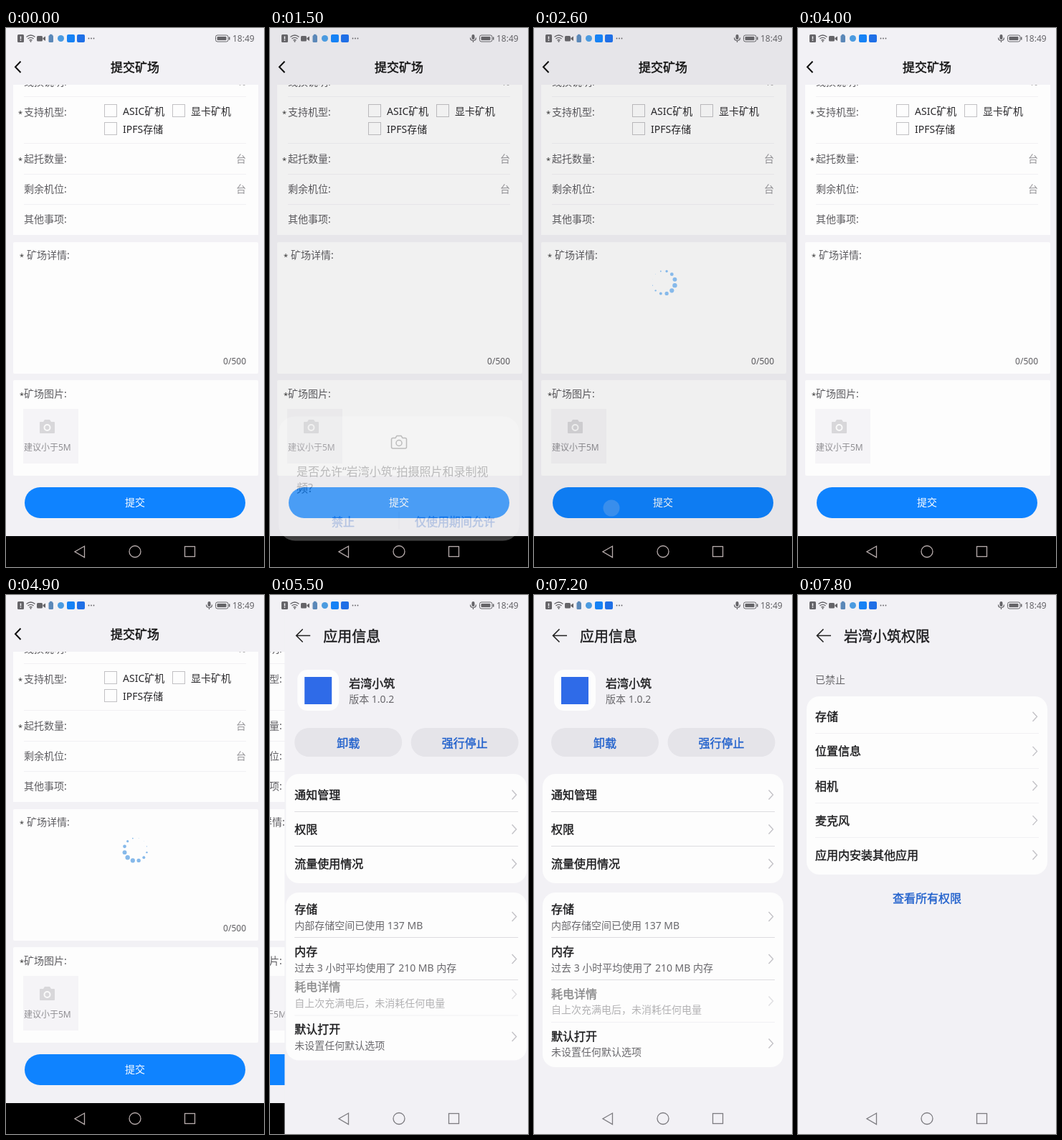
Write an HTML page that moves like this. It is 360 by 750 pixels and loops after 8 s.

```html
<!DOCTYPE html>
<html lang="zh-CN">
<head>
<meta charset="utf-8">
<style>
html, body { margin: 0; width: 100%; height: 100%; overflow: hidden; background: #f2f1f5; }
svg { display: block; width: 100vw; height: 100vh; }
text { font-family: "Noto Sans", "Noto Sans CJK SC", "Noto Sans CJK", sans-serif; white-space: pre; }
</style>
</head>
<body>
<svg id="stage" viewBox="0 0 360 750" xmlns="http://www.w3.org/2000/svg"></svg>
<script>
const LOOP = 8000, STEP = 100;
const APP = '岩湾小筑';
const BG = '#f2f1f5', CARD = '#fdfdfd', INK = '#1b1b1d', GREY = '#5d5c60', BLUE = '#2060cc';
const FAINT = '#f1f0f3';

// y is the visual middle of the line
const text = (s, x, y, size = 14, fill = GREY, anchor = 'start', more = '') =>
  `<text x="${x}" y="${y + size * .38}" font-size="${size}" fill="${fill}" text-anchor="${anchor}" ${more}>${s}</text>`;
// A hairline outline gives the medium weight
const medium = (s, x, y, size = 16, fill = INK, anchor = 'start') =>
  text(s, x, y, size, fill, anchor, `stroke="${fill}" stroke-width=".4"`);
const rect = (x, y, w, h, fill, r = 0, more = '') =>
  `<rect x="${x}" y="${y}" width="${w}" height="${h}" fill="${fill}" rx="${r}" ${more}/>`;
const path = (d, stroke, width = 1, more = '') =>
  `<path d="${d}" fill="none" stroke="${stroke}" stroke-width="${width}" ${more}/>`;
const group = (id, body, more = '') => `<g id="${id}" ${more}>${body}</g>`;
const rule = (y, x = 24, end = 336, color = '#dddce0') => path(`M${x} ${y + .5}H${end}`, color);
const chevron = y => path(`M327.5 ${y - 6.5}l6 6.5l-6 6.5`, '#c3c2c7', 1.4);

function formPage() {
  const line = y => rule(y, 25, 335, FAINT);
  const star = (x, y) => text('*', x, y + 1.5, 11, '#333');
  const check = (label, x, y) =>
    rect(x + .5, y + .5, 17, 17, CARD, 0, 'stroke="#c2c1c4"') + text(label, x + 26, y + 10, 14, '#29282b');
  return rect(0, 0, 360, 707, BG) + rect(0, 707, 360, 43, '#000') +
    rect(10, 79, 342, 209, CARD) + rect(10, 298, 342, 183, CARD, 2) + rect(10, 490, 342, 133, CARD, 2) +
    `<g clip-path="url(#body)">${text('线损说明:', 25, 75)}${text('%', 335, 75, 14, '#999', 'end')}</g>` +
    [95, 160, 203, 245].map(line).join('') +
    star(17, 117) + text('支持机型:', 25, 117) +
    check('ASIC矿机', 137, 106) + check('显卡矿机', 232, 106) + check('IPFS存储', 137, 131) +
    star(17, 182) + text('起托数量:', 25, 182) + text('台', 321, 182, 14, '#99989c') +
    text('剩余机位:', 25, 224) + text('台', 321, 224, 14, '#99989c') +
    text('其他事项:', 25, 266) +
    star(19, 316) + text('矿场详情:', 29, 316) + text('0/500', 335, 463, 12, GREY, 'end') +
    star(19, 509) + text('矿场图片:', 25, 509) +
    rect(24, 530, 77, 76, '#f5f4f7') +
    `<path d="M48 548h4l2-3h7l2 3h4q1 0 1 1v14q0 1-1 1h-19q-1 0-1-1v-14q0-1 1-1z" fill="#d8d7da"/>` +
    `<circle cx="57.5" cy="556" r="4" fill="none" stroke="#fafafa" stroke-width="2"/>` +
    text('建议小于5M', 25, 583, 12, '#8f8e92') +
    rect(26, 639, 308, 43, '#0f83ff', 21.5) + text('提交', 180, 660, 14, '#fff', 'middle') +
    path('M20.5 46.5L13 54.2L20.5 62', '#111', 2) +
    medium('提交矿场', 180, 55, 17, '#111', 'middle');
}

const titleBar = title => rect(0, 0, 360, 750, BG) +
  path('M46 56.5H27M35.5 47.500l-9 9l9 9', '#222', 1.6) + medium(title, 64, 57, 20);

function infoPage() {
  const row = (s, y) => medium(s, 24, y) + chevron(y);
  const detail = (s, sub, y) =>
    medium(s, 24, y) + text(sub, 24, y + 22.5, 14, '#69686c') + chevron(y + 10.5);
  const button = (s, x) => rect(x, 185, 150, 40, '#e5e4e9', 20) + medium(s, x + 75, 206, 16, BLUE, 'middle');
  return titleBar('应用信息') +
    rect(28, 104, 58, 57, CARD, 14) + rect(38, 114, 38, 38, '#2f6be8') +
    medium(APP, 100, 123) + text('版本 1.0.2', 100, 145, 14, '#69686c') +
    button('卸载', 24) + button('强行停止', 186.5) +
    rect(12, 249, 336, 152, CARD, 18) +
    row('通知管理', 278) + rule(301) + row('权限', 326) + rule(349) + row('流量使用情况', 374) +
    rect(12, 414, 336, 243, CARD, 18, 'id="usage"') +
    detail('存储', '内部存储空间已使用 137 MB', 437) + rule(476) +
    detail('内存', '过去 3 小时平均使用了 210 MB 内存', 496) + rule(535) +
    group('lowerRows',
      `<g opacity=".5">${detail('耗电详情', '自上次充满电后，未消耗任何电量', 554.5)}</g>` +
      rule(594, 24, 336, FAINT) + detail('默认打开', '未设置任何默认选项', 613.5));
}

function permissionPage() {
  const rows = ['存储', '位置信息', '相机', '麦克风', '应用内安装其他应用'];
  return titleBar(APP + '权限') + text('已禁止', 24, 118, 14, '#69686c') +
    rect(12, 141, 336, 248, CARD, 18) +
    rows.map((s, i) => {
      const y = 169.3 + i * 48.1;
      return (i ? rule(Math.round(y - 25), 24, 336, FAINT) : '') + medium(s, 24, y) + chevron(y);
    }).join('') +
    medium('查看所有权限', 180, 422, 16, BLUE, 'middle');
}

const dialog = () => rect(12, 518, 336, 173, CARD, 23) +
  path('M171.5 548h3.5l2-3h6l2 3h3.5q2 0 2 2v10.500q0 2-2 2h-17q-2 0-2-2v-10.500q0-2 2-2z', '#222', 1.5) +
  `<circle cx="180" cy="555" r="4" fill="none" stroke="#222" stroke-width="1.5"/>` +
  text(`是否允许“${APP}”拍摄照片和录制视`, 37, 594, 16, INK) + text('频?', 37, 617, 16, INK) +
  path('M180 651v24', '#dddce0') +
  medium('禁止', 102, 664, 16, BLUE, 'middle') + medium('仅使用期间允许', 258, 664, 16, BLUE, 'middle');

// Grey status marks inherit currentColor so they can turn white over the dim layer
const statusBar = () => {
  const c = 'currentColor';
  return rect(16, 9, 9, 11, c, 1.5) + path('M20.500 11.500v4M20.500 16.500v1.500', BG, 1.4) +
    path('M28.500 12.500q6-5 12 0M30.500 15q4-3.300 8 0M32.500 17.300q2-1.600 4 0', c, 1.4) +
    `<circle cx="34.500" cy="18.800" r="1" fill="${c}"/>` +
    rect(43, 11, 8, 7.500, c, 1.5) + `<path d="M51.500 14l3.500-2.500v6.500l-3.500-2.500z" fill="${c}"/>` +
    rect(59.500, 10, 6.500, 10, '#5b88b8', 1.5) + rect(61, 8.800, 3.500, 2, '#5b88b8') +
    `<circle cx="76.500" cy="14.500" r="4.500" fill="#4b9be0"/>` +
    rect(85, 9, 11, 11, '#1682f5', 2) + rect(99, 9, 11, 11, '#1f6fe6', 2) +
    [115.5, 119, 122.5].map(x => `<circle cx="${x}" cy="14.500" r=".9" fill="${c}"/>`).join('') +
    group('mic', rect(281.500, 9, 4, 7, c, 2) + path('M279.500 13.500q0 4 4 4t4-4M283.500 17.500v2.500', c, 1.2)) +
    rect(292.500, 10, 17.500, 9, 'none', 2.5, `stroke="${c}"`) + rect(294.500, 12, 13, 5, c, 1) + rect(311, 12.500, 1.5, 4, c) +
    text('18:49', 316, 14.500, 12, c);
};

const slidingPage = (id, body) =>
  `<clipPath id="${id}Clip">${rect(0, 0, 360, 750, '#000', 0, `id="${id}Edge"`)}</clipPath>` +
  group(id, body, `clip-path="url(#${id}Clip)"`);

const stage = document.getElementById('stage');
stage.innerHTML =
  '<clipPath id="body"><rect x="0" y="79" width="360" height="628"/></clipPath>' +
  group('form', formPage()) +
  rect(0, 0, 360, 707, '#000', 0, 'id="dim"') +
  group('spinner', '<circle/>'.repeat(12), 'fill="#86b9ea"') +
  group('dialog', dialog()) +
  '<circle id="touch" cx="108" cy="668" r="11.500" fill="#a9bfdf" fill-opacity=".28"/>' +
  slidingPage('info', infoPage()) + slidingPage('permission', permissionPage()) +
  group('status', statusBar()) +
  group('nav', '<path d="M109.500 721v15.500l-13.500-7.800z"/><circle cx="180" cy="728.500" r="8"/><rect x="249.500" y="721.500" width="14" height="14"/>',
    'fill="none" stroke-width="1.300"');

const parts = Object.fromEntries(
  ['form', 'dim', 'spinner', 'dialog', 'touch', 'info', 'infoEdge', 'permission', 'permissionEdge',
    'status', 'nav', 'mic', 'usage', 'lowerRows'].map(id => [id, document.getElementById(id)]));
const dots = [...parts.spinner.children];

const clamp = v => Math.max(0, Math.min(1, v));
const ramp = (t, from, to) => clamp((t - from) / (to - from));
const show = (node, on) => node.setAttribute('visibility', on ? 'visible' : 'hidden');
const move = (node, x, y = 0) => node.setAttribute('transform', `translate(${x} ${y})`);

// cubic-bezier(.2, 0, .2, 1), solved by bisection
function ease(p) {
  let low = 0, high = 1;
  for (let i = 0; i < 20; i++) {
    const s = (low + high) / 2;
    if (.6 * s * (1 - s) + s ** 3 < p) low = s; else high = s;
  }
  return low * low * (3 - 2 * low);
}

const LOADING = [[600, 1500], [2500, 3300], [4400, 5100]];

function drawSpinner(t) {
  const phase = (20 + (t - 2600) * .36) * Math.PI / 180;
  dots.forEach((dot, i) => {
    const a = (i * 30 + 15) * Math.PI / 180;
    dot.setAttribute('cx', 181 + 16 * Math.cos(a));
    dot.setAttribute('cy', 354 + 16 * Math.sin(a));
    dot.setAttribute('r', .2 + 3 * (.5 + .5 * Math.cos(a - phase)) ** .9);
  });
}

// The new page is uncovered from the right while its content travels half as far;
// the page below drifts left by a fifth of the width. Returns the uncovering edge.
function slide(name, below, t, start) {
  const p = ease(ramp(t, start, start + 350)), left = 1 - p;
  show(parts[name], p > 0);
  move(parts[name], 180 * left);
  parts[name + 'Edge'].setAttribute('x', 180 * left);
  if (p > 0) move(below, -72 * p);
  return 360 * left;
}

function draw(t) {
  const loading = LOADING.some(([a, b]) => t >= a && t < b);
  show(parts.spinner, loading);
  if (loading) drawSpinner(t);

  const opening = ease(ramp(t, 1450, 1750));
  const dim = opening * (1 - ramp(t, 2330, 2700));
  const shown = opening * (1 - ramp(t, 2330, 2580));
  parts.dim.setAttribute('opacity', .19 * dim);
  show(parts.dialog, shown > 0);
  parts.dialog.setAttribute('opacity', shown);
  move(parts.dialog, 0, 30 * (1 - shown));
  show(parts.touch, t >= 2400 && t < 2700);

  move(parts.form, 0);
  const edge = slide('info', parts.form, t, 5255);
  slide('permission', parts.info, t, 7255);

  const lift = 9.5 * (1 - ramp(t, 5500, 5700));
  move(parts.lowerRows, 0, -lift);
  parts.usage.setAttribute('height', 243 - lift);

  show(parts.mic, t >= 1500);
  parts.status.setAttribute('color', dim > .5 ? '#fff' : '#656468');
  parts.nav.setAttribute('stroke', edge < 90 ? '#7d7c80' : '#b8adad');
}

const begin = performance.now();
function tick() {
  const t = (performance.now() - begin) % LOOP;
  draw(Math.floor(t / STEP) * STEP);
  requestAnimationFrame(tick);
}
draw(0);
requestAnimationFrame(tick);
</script>
</body>
</html>
```
